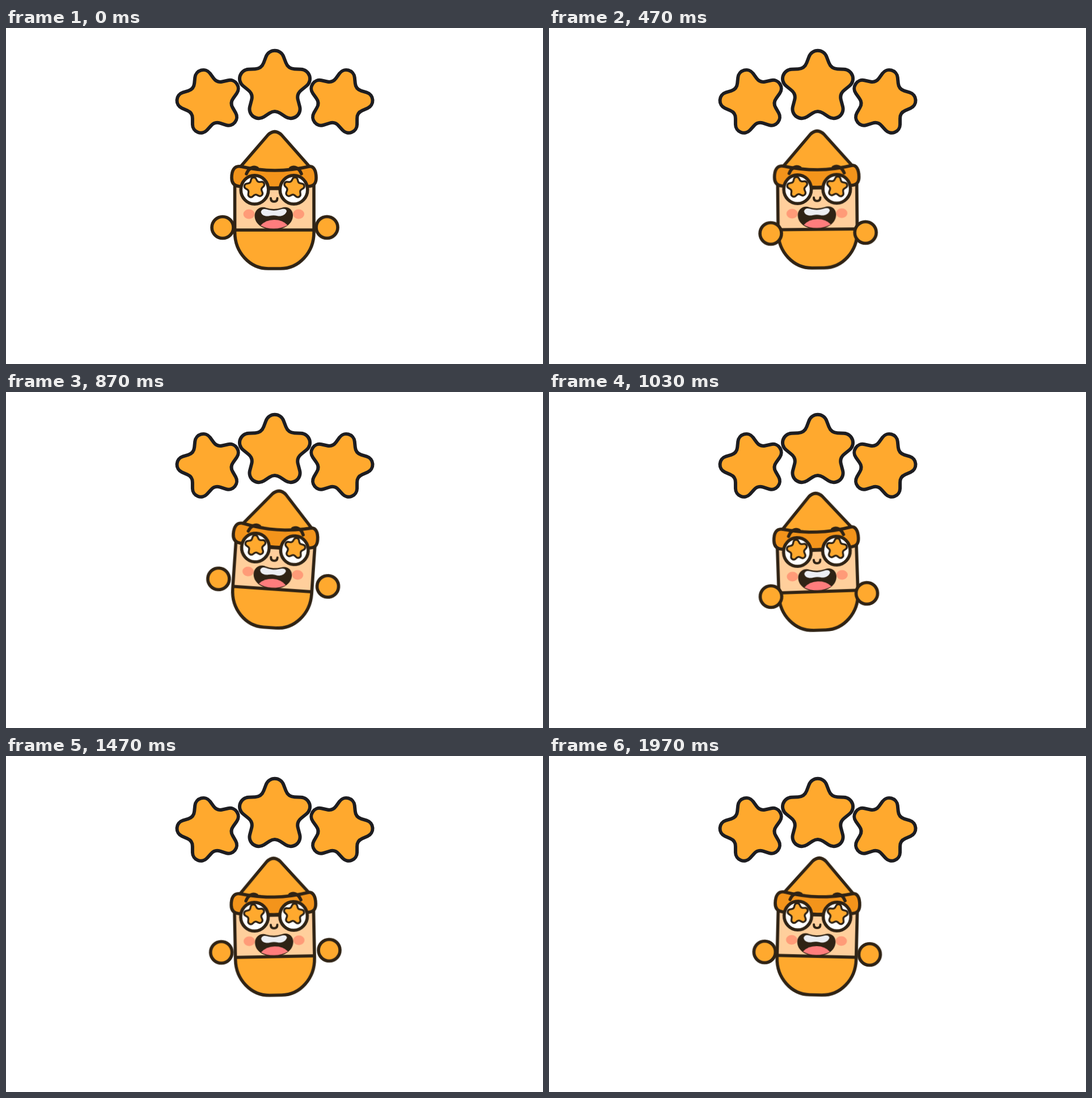
An HTML page without scripts that plays this animation: 947 px wide and 592 px high, repeating every 2010 ms.

```html
<!DOCTYPE html>
<html lang="en">
<head>
<meta charset="utf-8">
<title>Star gnome</title>
<style>
  html, body { margin: 0; width: 100%; height: 100%; overflow: hidden; background: #fff; }
  svg { display: block; width: 947px; height: 592px; }

  .gold { fill: #ffa92e; }
  .line { stroke: #2f2315; stroke-width: 5.6; stroke-linejoin: round; stroke-linecap: round; }
  .bare { fill: none; }
  .dark { fill: #2f2315; }
  .big { stroke: #1d1d21; stroke-width: 6; }
  .small { stroke: #2f2315; stroke-width: 3.3; }
  #star { vector-effect: non-scaling-stroke; }

  .gnome { transform-origin: 473px 303.5px; animation: hop 2010ms linear infinite; }
  .hand { animation: flap 2010ms linear infinite; }

  /* four hops, leaning left and right in turn */
  @keyframes hop {
    0%, 24.2%, 48.6%, 74.9%, 100% { transform: translateY(0) rotate(0deg); }
    12.1%, 61.2% { transform: translateY(-20px) rotate(-9.1deg); }
    36.4%, 87.1% { transform: translateY(-20px) rotate(9.1deg); }
  }

  @keyframes flap {
    0%, 100% { transform: translate(0, 0); }
    11.4% { transform: translate(5px, -7.5px); }
    23.6% { transform: translate(-8.6px, 11.2px); }
    42.8% { transform: translate(5.5px, -8.3px); }
    50.7% { transform: translate(-8px, 11.3px); }
    64.2% { transform: translate(5.2px, -7.9px); }
    71.4% { transform: translate(5.3px, -8.1px); }
    79.6% { transform: translate(-4.4px, 6.6px); }
    90.5% { transform: translate(4.6px, -7.6px); }
    98% { transform: translate(.6px, -1.1px); }
  }
</style>
</head>
<body>
<svg viewBox="0 0 947 592">
  <defs>
    <path id="star" d="M-15.4-53.7A16.5 16.5 0 0 1 15.4-53.7L19.6-42.7Q23.5-32.4 34.6-31.8
      L46.3-31.3A16.5 16.5 0 0 1 55.9-2L46.7 5.5Q38 12.4 41 23
      L44 34.4A16.5 16.5 0 0 1 19.1 52.5L9.2 46.1Q0 40-9.2 46.1
      L-19.1 52.5A16.5 16.5 0 0 1-44 34.4L-41 23Q-38 12.4-46.7 5.5
      L-55.9-2A16.5 16.5 0 0 1-46.3-31.3L-34.6-31.8Q-23.5-32.4-19.6-42.7Z"/>
  </defs>

  <g class="gold big">
    <use href="#star" transform="translate(359 130) rotate(-15) scale(.895)"/>
    <use href="#star" transform="translate(589 130) rotate(15) scale(.895)"/>
    <use href="#star" transform="translate(474 104)"/>
  </g>

  <g class="gnome">
    <!-- body -->
    <path fill="#ffcf9c" d="M403.5 265H543V358H403.5Z"/>
    <path class="gold" d="M403.5 356H543V360A59 64 0 0 1 484 424H462.5A59 64 0 0 1 403.5 360Z"/>
    <path class="line bare" d="M403.5 270V360A59 64 0 0 0 462.5 424H484A59 64 0 0 0 543 360V270M403.5 356H543"/>

    <!-- hat -->
    <path class="line" fill="#f3941b" d="M414 244C402 242 398 252 398 264C398 273 402 278 411 279
      Q473 285 535 279C544 278 547 273 547 264C547 252 543 242 533 244Z"/>
    <path class="gold line" d="M414 244L462 188.500Q474 177 486 188.500L535 244Q474 258 414 244Z"/>

    <!-- brows and glasses -->
    <path class="line bare" d="M424 257C428 247 436 243 443 247M521 257C517 247 509 243 502 247M463 283H483"/>
    <g class="line" fill="#fff">
      <ellipse cx="438.5" cy="285" rx="24.3" ry="25.3"/>
      <ellipse cx="507.5" cy="285" rx="24.3" ry="25.3"/>
    </g>
    <g class="gold small">
      <use href="#star" transform="translate(438.5 281.5) rotate(-7) scale(.285)"/>
      <use href="#star" transform="translate(508 281.5) rotate(7) scale(.285)"/>
    </g>

    <!-- face -->
    <path class="line bare" style="stroke-width:4" d="M467 300Q467 306 472.7 306Q478.5 306 478.5 300"/>
    <g fill="#ff9b78">
      <ellipse cx="428.5" cy="328" rx="10" ry="8.5"/>
      <ellipse cx="516" cy="328" rx="10" ry="8.5"/>
    </g>
    <path class="dark" d="M438.5 331C438.5 320 449 313 459 317Q472 321 486 317C496 313 506 319 506 330
      C506 346 490 355.5 472 355.5C454 355.5 438.5 346 438.5 331Z"/>
    <path fill="#eceef3" d="M449.5 324C452 317 458 319 463 320.5Q473 323 483 320C490 318 494 318 495 323
      C492 331 484 332.5 478 331Q472 329.5 465 331C458 332.5 451 331 449.5 324Z"/>
    <path fill="#ff7d7d" d="M449 348Q458 338 473 338Q488 338 496.5 347.5Q486 353.5 472 353.5Q458 353.5 449 348Z"/>

    <!-- hands -->
    <g class="gold line">
      <circle class="hand" cx="566" cy="351.5" r="19"/>
      <g transform="translate(948 0) scale(-1 1)">
        <circle class="hand" cx="566" cy="351.5" r="19"/>
      </g>
    </g>
  </g>
</svg>
</body>
</html>
```
